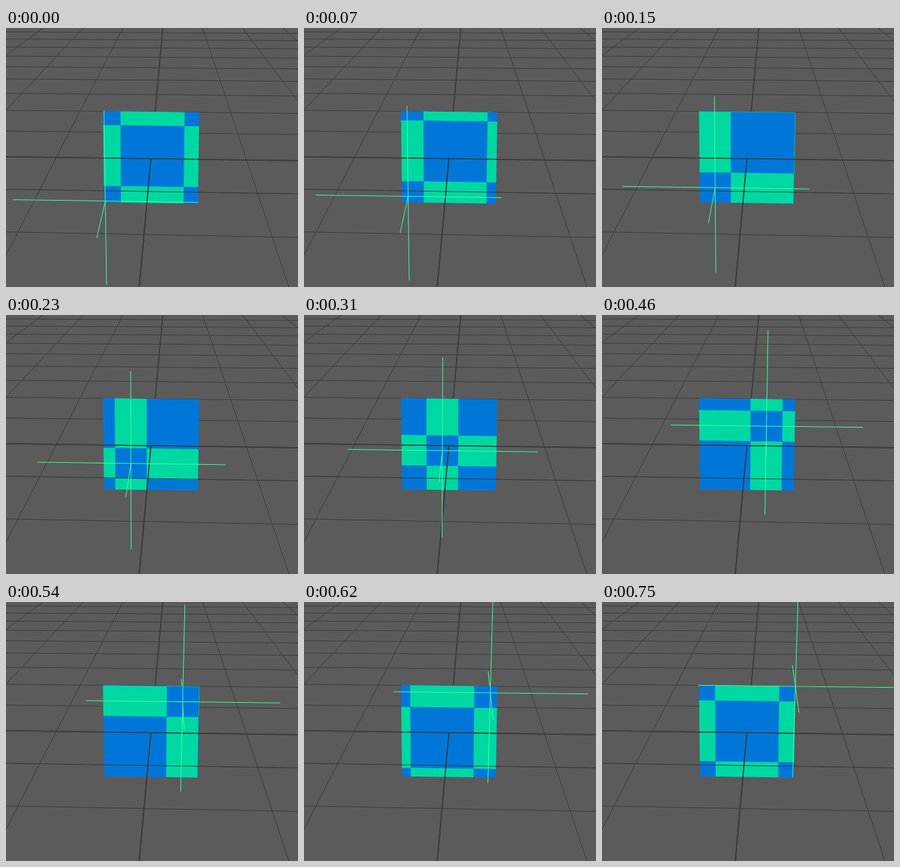
Write an HTML page with a canvas that moves like this. It is 447 by 396 pixels and loops after 0.83 s.

```html
<!DOCTYPE html>
<html lang="en">
<head>
<meta charset="utf-8">
<title>Locator driving a texture</title>
<style>
html, body { margin: 0; width: 100%; height: 100%; overflow: hidden; background: #5b5b5b; }
canvas { display: block; }
</style>
</head>
<body>
<canvas id="stage" width="447" height="396"></canvas>
<script>
const W = 447, H = 396, LOOP = 830;
const STEPS = [0, 70, 150, 230, 310, 380, 460, 540, 620, 700, 750];
const BLUE = '#0077d8', GREEN = '#00d8a2', MINT = '#43ffa3', GRID = '#3c3c3c';
const ctx = document.getElementById('stage').getContext('2d');

function line(x1, y1, x2, y2, color = GRID, width = 1) {
  ctx.strokeStyle = color;
  ctx.lineWidth = width;
  ctx.beginPath();
  ctx.moveTo(x1, y1);
  ctx.lineTo(x2, y2);
  ctx.stroke();
}

// Floor lines in perspective: row 0 and column 0 are the heavy axes.
function row(n) {
  const y = 3109 / (8.42 + n) - 172.5;
  line(0, y, W, y * 1.02 + 2.2, GRID, n ? 1 : 1.7);
}

function column(n, top = 0) {
  const far = 240 + 61 * n, near = 204 + 229 * n;
  line(far + (near - far) * top / H, top, near, H, GRID, n ? 1 : 1.8);
}

// Point on the plane; u runs right and v runs up, both from 0 to 1.
function planePoint(u, v) {
  const left = 150 - 1.5 * v, right = 293.7 + 2.3 * v;
  const yLeft = 266.5 - 139.5 * v, yRight = 268.5 - 139.5 * v;
  return [left + (right - left) * u, yLeft + (yRight - yLeft) * u];
}

function addQuad(u1, v1, u2, v2) {
  ctx.moveTo(...planePoint(u1, v1));
  ctx.lineTo(...planePoint(u2, v1));
  ctx.lineTo(...planePoint(u2, v2));
  ctx.lineTo(...planePoint(u1, v2));
  ctx.closePath();
}

function drawPlane(p) {
  ctx.beginPath();
  addQuad(0, 0, 1, 1);
  ctx.fillStyle = BLUE;
  ctx.fill();

  // Two wrapping bands, a third wide; their crossing stays blue.
  ctx.beginPath();
  for (let k = -1; k <= 1; k++) {
    const a = Math.max(0, p + k - 1 / 6), b = Math.min(1, p + k + 1 / 6);
    if (a >= b) continue;
    addQuad(a, 0, b, 1);
    addQuad(0, a, 1, b);
  }
  ctx.fillStyle = GREEN;
  ctx.fill('evenodd');
}

function draw(time) {
  const s = Math.min(1, (time + 57) / 810);
  const p = s * s * (3 - 2 * s);
  const [x, y] = planePoint(p, p);
  const depthX = 19 * p - 13.5, depthY = 57 - 17 * p;

  ctx.fillStyle = '#5b5b5b';
  ctx.fillRect(0, 0, W, H);
  for (let n = -2; n <= 9; n++) row(n);
  for (let n = -4; n <= 4; n++) column(n);

  line(x, y, x - depthX * 0.8, y - depthY * 0.8, MINT);
  drawPlane(p);
  row(0);
  row(-1);
  column(0, 199);

  const tiltX = 0.0143 - 0.003 * p, tiltY = 0.0156 - 0.046 * p;
  const left = 141 + 8 * p, right = 142.5 + 8 * p;
  const up = 137.5 + 13 * p, down = 128 + 11 * p;
  line(x - left, y - left * tiltX, x + right, y + right * tiltX, MINT);
  line(x - up * tiltY, y - up, x + down * tiltY, y + down, MINT);
  line(x, y, x + depthX, y + depthY, MINT);
}

function tick() {
  const time = performance.now() % LOOP;
  draw(STEPS.findLast(start => start <= time));
  requestAnimationFrame(tick);
}
tick();
</script>
</body>
</html>
```
